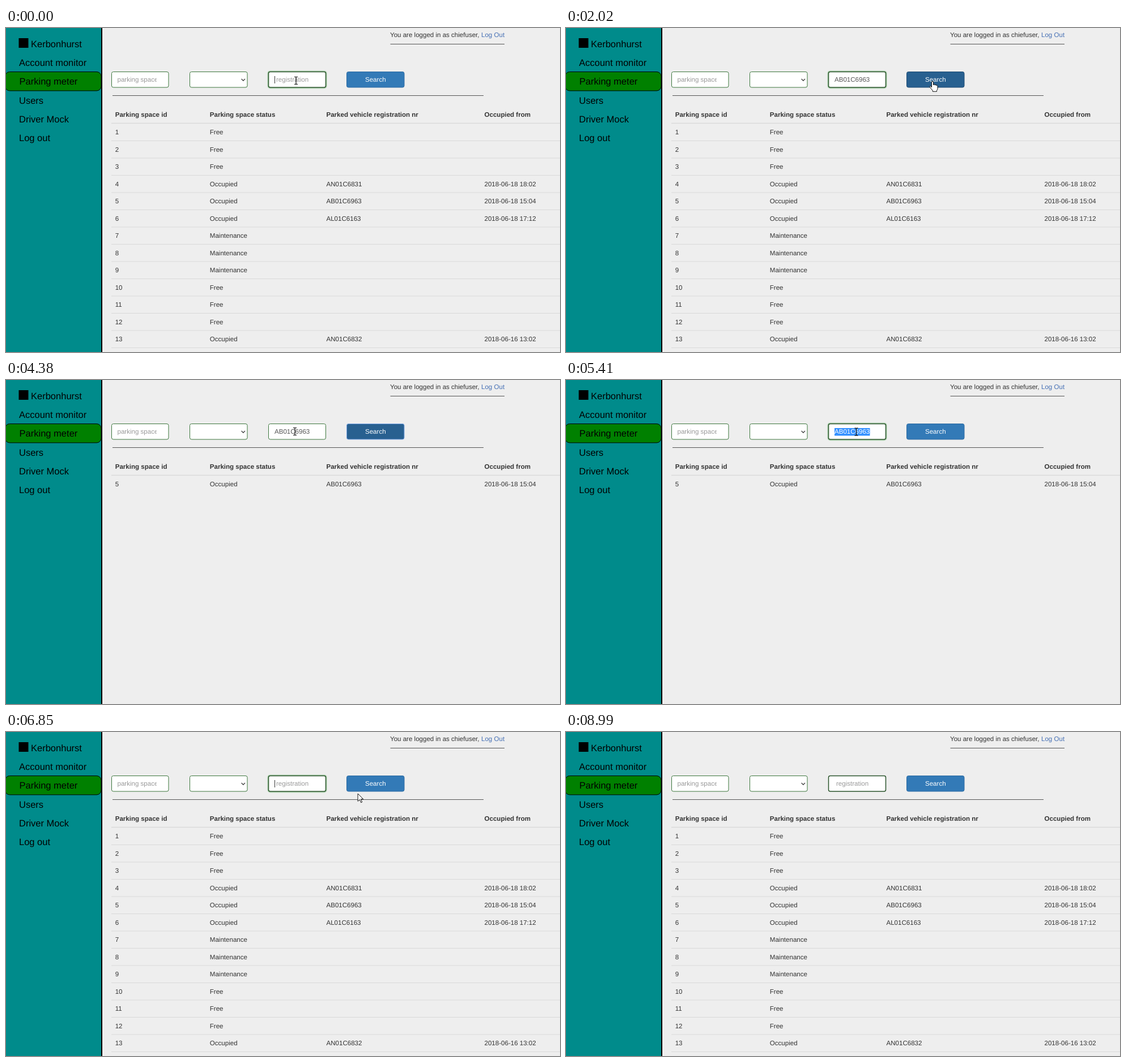
An HTML page that plays this animation: 978x573 px, repeating every 9.09 s.

```html
<!DOCTYPE html>
<html lang="en">
<head>
<meta charset="utf-8">
<title>Parking meter</title>
<style>
html, body { margin: 0; width: 100%; height: 100%; overflow: hidden; background: #eee; }
svg { display: block; }
text { font: 11.55px "Liberation Sans", Arial, sans-serif; fill: #333; text-rendering: geometricPrecision; white-space: pre; }
.menu text { font-size: 16.5px; fill: #000; }
.head text { font-weight: bold; }
.box { fill: #fff; stroke: #3c763d; }
.hint { fill: #999; }
.value { fill: #555; }
.rule { stroke: #555; }
.line { stroke: #d9d9d9; }
</style>
</head>
<body>
<svg width="978" height="573" viewBox="0 0 978 573">
  <rect width="978" height="573" fill="#eee"/>
  <rect width="168.5" height="573" fill="#008b8b"/>
  <rect x="168" width="2" height="573"/>
  <rect x="-1.5" y="77.5" width="169.5" height="33.5" rx="8" fill="green" stroke="#000"/>
  <rect x="22.5" y="18" width="17" height="17"/>
  <g id="menu" class="menu"></g>

  <text x="678" y="15.8">You are logged in as chiefuser,</text>
  <text x="839" y="15.8" style="fill:#4670b5">Log Out</text>
  <path class="rule" d="M678.5 28.5H880M188 119.5H843"/>

  <clipPath id="clip"><rect x="196" y="80" width="70" height="24"/></clipPath>
  <rect class="box" x="186.5" y="77.5" width="100.5" height="27.5" rx="3"/>
  <text class="hint" x="196.5" y="95.4" clip-path="url(#clip)">parking space</text>
  <rect class="box" x="324.5" y="77.5" width="101.5" height="27.5" rx="3"/>
  <path d="M415.6 90l3.2 3.3 3.2-3.3" fill="none" stroke="#444" stroke-width="1.3"/>

  <rect id="glow" x="462.4" y="76.4" width="103.2" height="29.8" rx="4" fill="none" stroke="#67b168" stroke-opacity=".5" stroke-width="2"/>
  <rect id="field" class="box" x="463.5" y="77.5" width="101" height="27.5" rx="3"/>
  <rect id="selection" x="474" y="85" width="62.5" height="13.5" fill="#3390ff"/>
  <text id="entry" y="95.4"></text>
  <rect id="caret" y="85" width="1" height="13" fill="#333"/>

  <rect id="button" x="601.5" y="77.5" width="101.5" height="27.5" rx="3"/>
  <text x="652.3" y="95.4" text-anchor="middle" style="fill:#fff">Search</text>

  <g id="head" class="head"></g>
  <path class="line" d="M186 168.5H978" stroke-width="1.6"/>
  <g id="all"></g>
  <g id="found"></g>

  <g id="pointer">
    <path id="ibeam" d="M-3-6.5H-1Q0-6.5 0-5.5 0-6.5 1-6.5H3M0-5.5V5.5M-3 6.5H-1Q0 6.5 0 5.5 0 6.5 1 6.5H3" fill="none" stroke="#111" stroke-width="1.2"/>
    <path id="arrow" d="M0 0V13.5L3.2 10.6 5.6 15.8 7.6 14.9 5.3 9.8H9.7Z" fill="#fff" stroke="#111"/>
    <path id="hand" d="M-1.5 10V1Q-1.5-.6 0-.6T1.5 1V6Q1.7 4.6 3 4.7T4.4 6.2Q4.8 5.1 6 5.4T7 7Q7.5 6.2 8.4 6.6T9 8V12Q9 14 7.5 15.5V17.3H.3V15.6L-4.6 9.6Q-5.2 8.2-4.2 7.8T-2.6 8.6Z" fill="#fff" stroke="#111"/>
  </g>
</svg>
<script>
const LOOP = 9090, ROW = 30.5, COLUMNS = [192.7, 359.8, 565.5, 844.5];
const PLATE = "AB01C6963";
const $ = id => document.getElementById(id);
const show = (id, on) => $(id).setAttribute("visibility", on ? "visible" : "hidden");
const set = (id, attrs) => { for (const k in attrs) $(id).setAttribute(k, attrs[k]); };
const label = (x, y, s) => `<text x="${x}" y="${y}">${s}</text>`;
const cells = (y, values) => values.map((s, i) => label(COLUMNS[i], y, s)).join("");

const parked = {
  4: ["AN01C6831", "2018-06-18 18:02"],
  5: [PLATE, "2018-06-18 15:04"],
  6: ["AL01C6163", "2018-06-18 17:12"],
  13: ["AN01C6832", "2018-06-16 13:02"]
};
function row(id, place) {
  const status = parked[id] ? "Occupied" : id > 6 && id < 10 ? "Maintenance" : "Free";
  return cells(188.4 + place * ROW, [id, status, ...(parked[id] || [])]);
}

$("menu").innerHTML = label(44, 33.6, "Kerbonhurst") +
  ["Account monitor", "Parking meter", "Users", "Driver Mock", "Log out"]
    .map((s, i) => label(i === 1 ? 23.6 : 23, 67 + i * 33.3, s)).join("");
$("head").innerHTML = cells(157.3, ["Parking space id", "Parking space status", "Parked vehicle registration nr", "Occupied from"]);
$("found").innerHTML = row(5, 0);
let rows = "";
for (let i = 0; i < 13; i++)
  rows += row(i + 1, i) + `<path class="line" d="M186 ${199.5 + i * ROW}H978"/>`;
$("all").innerHTML = rows;

// Pointer path: time, x, y
const path = [
  [150, 512, 93], [440, 646, 112], [1500, 646, 112], [2020, 647, 95], [2420, 647, 95],
  [2860, 604, 226], [2990, 604, 226], [3300, 604, 189], [3460, 600, 187], [3700, 579, 184],
  [3920, 592, 187], [4380, 510, 91], [5120, 510, 91], [5590, 514, 92], [6030, 607, 95],
  [6300, 607, 95], [6850, 621, 109], [7210, 640, 125], [7500, 720, 250], [7800, 830, 420],
  [8160, 915, 545], [8560, 900, 573]
];
// Caret: from, to, x
const blinks = [
  [0, 380, 474], [870, 1180, 474], [1180, 1690, 536.6], [4670, 5170, 510.5],
  [5590, 6090, 474], [6590, 7090, 474], [7590, 8090, 474], [8560, 8990, 474]
];

function pointerAt(t) {
  const i = path.findIndex(p => p[0] > t);
  if (i === 0) return path[0].slice(1);
  if (i < 0) return path[path.length - 1].slice(1);
  const [t0, x0, y0] = path[i - 1], [t1, x1, y1] = path[i], k = (t - t0) / (t1 - t0);
  return [x0 + (x1 - x0) * k, y0 + (y1 - y0) * k];
}
const within = (v, a, b) => v >= a && v < b;

function draw(t) {
  const [x, y] = pointerAt(t), inBar = within(y, 77, 106);
  const onButton = inBar && within(x, 601, 704);
  const onText = inBar && within(x, 463, 566) || within(y, 178, 192) && within(x, 565, 629);
  const pressed = within(t, 2450, 4560), filled = within(t, 1180, 5590);
  const selected = within(t, 5230, 5590), full = !within(t, 2570, 6390);

  const visible = t < 8560;
  show("ibeam", visible && onText);
  show("hand", visible && onButton);
  show("arrow", visible && !onText && !onButton);
  set("pointer", { transform: `translate(${x.toFixed(1)} ${y.toFixed(1)})` });

  show("glow", !pressed && t < 8990);
  set("field", { style: pressed ? "" : "stroke:#2b542c;stroke-width:1.5" });
  set("entry", {
    x: filled ? 474 : 477, class: filled ? "value" : "hint",
    style: selected ? "fill:#fff" : ""
  });
  $("entry").textContent = filled ? PLATE : "registration";
  show("selection", selected);
  const blink = blinks.find(b => within(t, b[0], b[1]));
  show("caret", blink);
  if (blink) set("caret", { x: blink[2] });

  const dark = pressed || onButton;
  set("button", {
    fill: dark ? "#286090" : "#337ab7",
    stroke: pressed ? "#7fa9e6" : dark ? "#204d74" : "#2e6da4"
  });
  show("all", full);
  show("found", !full);
}

const start = performance.now();
function tick() {
  draw((performance.now() - start) % LOOP);
  requestAnimationFrame(tick);
}
tick();
</script>
</body>
</html>
```
